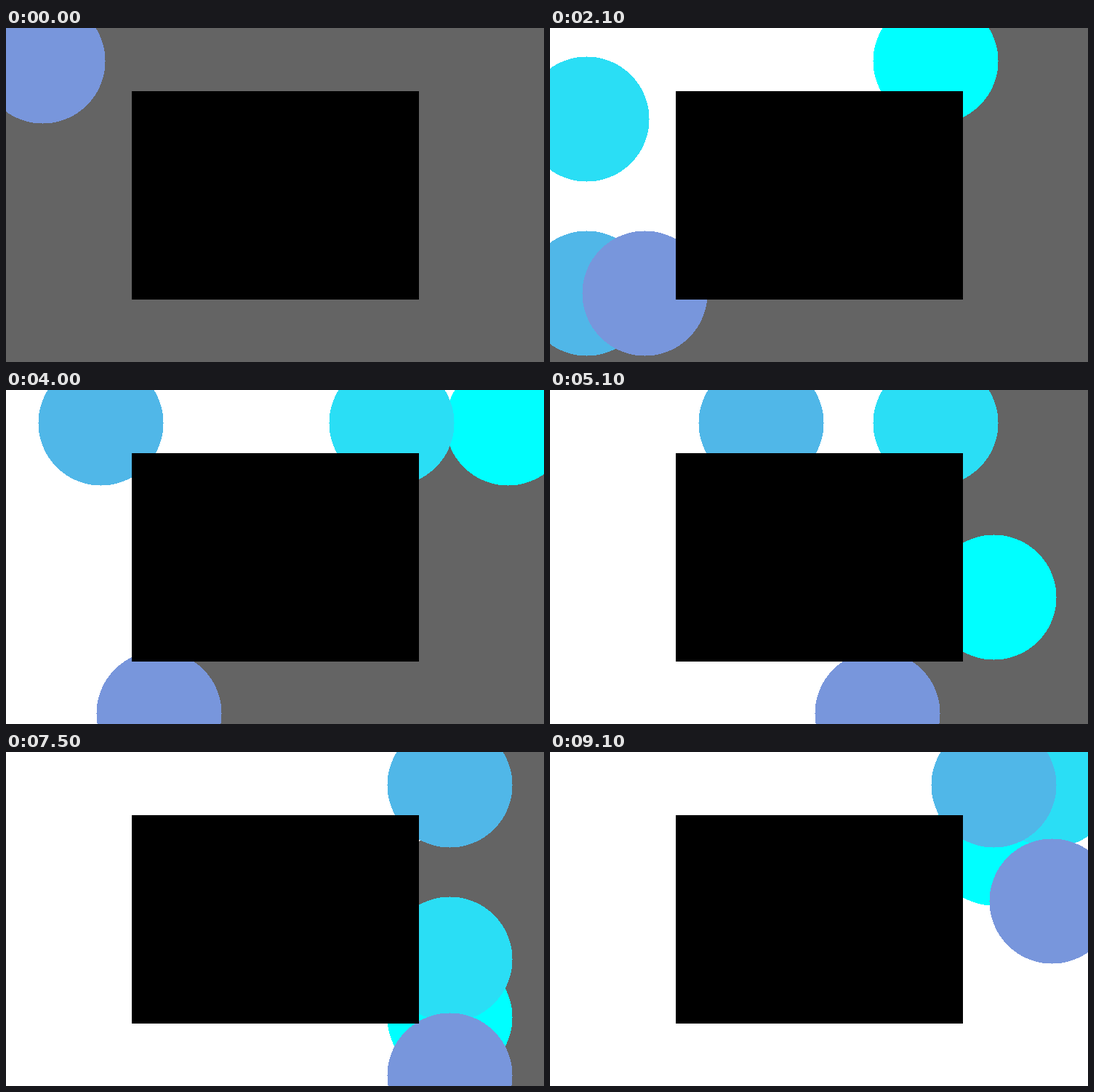
Recreate the animation shown at these times as an HTML page with a canvas. Size 740 px wide and 460 px high, loop 9.2 s.

```html
<!DOCTYPE html>
<html lang="en">
<head>
<meta charset="utf-8">
<title>Four searchers clearing a room</title>
<style>
  html, body { margin: 0; width: 100%; height: 100%; overflow: hidden; background: #646464; }
  canvas { display: block; }
</style>
</head>
<body>
<canvas id="stage" width="740" height="460"></canvas>
<script>
const W = 740, H = 460, SIZE = W * H;
const STEP = 100, STEPS = 92;
const CELL = 80, ORIGIN = { x: 50, y: 45 }, RADIUS = 86;
const WALL = { left: 173, top: 87, right: 568, bottom: 374 };

// Each move is the step at which a searcher enters the next cell, and its direction.
const searchers = [
  { color: [0, 255, 255], moves: "2R 6R 8R 13R 14R 18R 29R 38R 41D 44D 48L 49D 52R 54D 56D 57L 63R 67U 69L 74D 75U 84U 86U 90U" },
  { color: [42, 222, 245], moves: "2D 11D 20U 22U 23R 24L 25D 26D 30U 31U 32R 33R 34R 35R 36R 37R 58R 59D 64D 66D 70D 71U 77U 78U 81R 82U 87D 91U" },
  { color: [80, 183, 232], moves: "3D 5U 7R 9D 10L 12R 13L 15D 16D 19D 27D 28U 29U 30U 38U 39U 40R 42R 46R 55R 61R 73R 75R 80L 89R" },
  { color: [120, 150, 220], moves: "1R 4D 12D 17D 21D 29D 35R 43R 47R 51R 60L 62R 65R 68R 76R 79U 85U 88U" }
];
const dirs = { R: [1, 0], L: [-1, 0], D: [0, 1], U: [0, -1] };

for (const s of searchers) {
  s.path = s.moves.split(" ").map(m => ({ step: parseInt(m, 10), dir: dirs[m.slice(-1)] }));
}

function centerOf(s, step) {
  let { x, y } = ORIGIN;
  for (const move of s.path) {
    if (move.step > step) break;
    x += move.dir[0] * CELL;
    y += move.dir[1] * CELL;
  }
  return { x, y };
}

function fillDisk(buffer, { x, y }, value) {
  const top = Math.max(0, y - RADIUS), bottom = Math.min(H - 1, y + RADIUS);
  for (let row = top; row <= bottom; row++) {
    const half = Math.floor(Math.sqrt(RADIUS * RADIUS - (row - y) ** 2));
    const left = Math.max(0, x - half), right = Math.min(W, x + half + 1);
    buffer.fill(value, row * W + left, row * W + right);
  }
}

function fillWall(buffer, value) {
  for (let row = WALL.top; row < WALL.bottom; row++) {
    buffer.fill(value, row * W + WALL.left, row * W + WALL.right);
  }
}

function blockedAt(step) {
  const blocked = new Uint8Array(SIZE);
  for (const s of searchers) {
    fillDisk(blocked, centerOf(s, step), 1);
    if (step > 0) fillDisk(blocked, centerOf(s, step - 1), 1);
  }
  fillWall(blocked, 1);
  return blocked;
}

// Unsearched area flows back into every open place that it can reach.
const stack = new Int32Array(SIZE);
function spread(old, blocked) {
  const dark = new Uint8Array(SIZE);
  let n = 0;
  const visit = i => {
    if (!dark[i] && !blocked[i]) {
      dark[i] = 1;
      stack[n++] = i;
    }
  };
  for (let i = 0; i < SIZE; i++) if (old[i]) visit(i);
  while (n) {
    const i = stack[--n], x = i % W;
    if (x > 0) visit(i - 1);
    if (x < W - 1) visit(i + 1);
    if (i >= W) visit(i - W);
    if (i < SIZE - W) visit(i + W);
  }
  return dark;
}

const masks = [];
function maskAt(step) {
  while (masks.length <= step) {
    const k = masks.length;
    const old = k ? masks[k - 1] : new Uint8Array(SIZE).fill(1);
    masks.push(spread(old, blockedAt(k)));
  }
  return masks[step];
}

const ctx = document.getElementById("stage").getContext("2d");
const image = ctx.createImageData(W, H);
const pixels = new Uint32Array(image.data.buffer);
const rgb = (r, g, b) => (255 << 24 | b << 16 | g << 8 | r) >>> 0;
const WHITE = rgb(255, 255, 255), GRAY = rgb(100, 100, 100), BLACK = rgb(0, 0, 0);

function draw(step) {
  const dark = maskAt(step);
  for (let i = 0; i < SIZE; i++) pixels[i] = dark[i] ? GRAY : WHITE;
  for (const s of searchers) fillDisk(pixels, centerOf(s, step), rgb(...s.color));
  fillWall(pixels, BLACK);
  ctx.putImageData(image, 0, 0);
}

const start = performance.now();
let shown = -1;
function tick() {
  const step = Math.floor((performance.now() - start) / STEP) % STEPS;
  if (step !== shown) draw(shown = step);
  requestAnimationFrame(tick);
}
tick();
</script>
</body>
</html>
```
